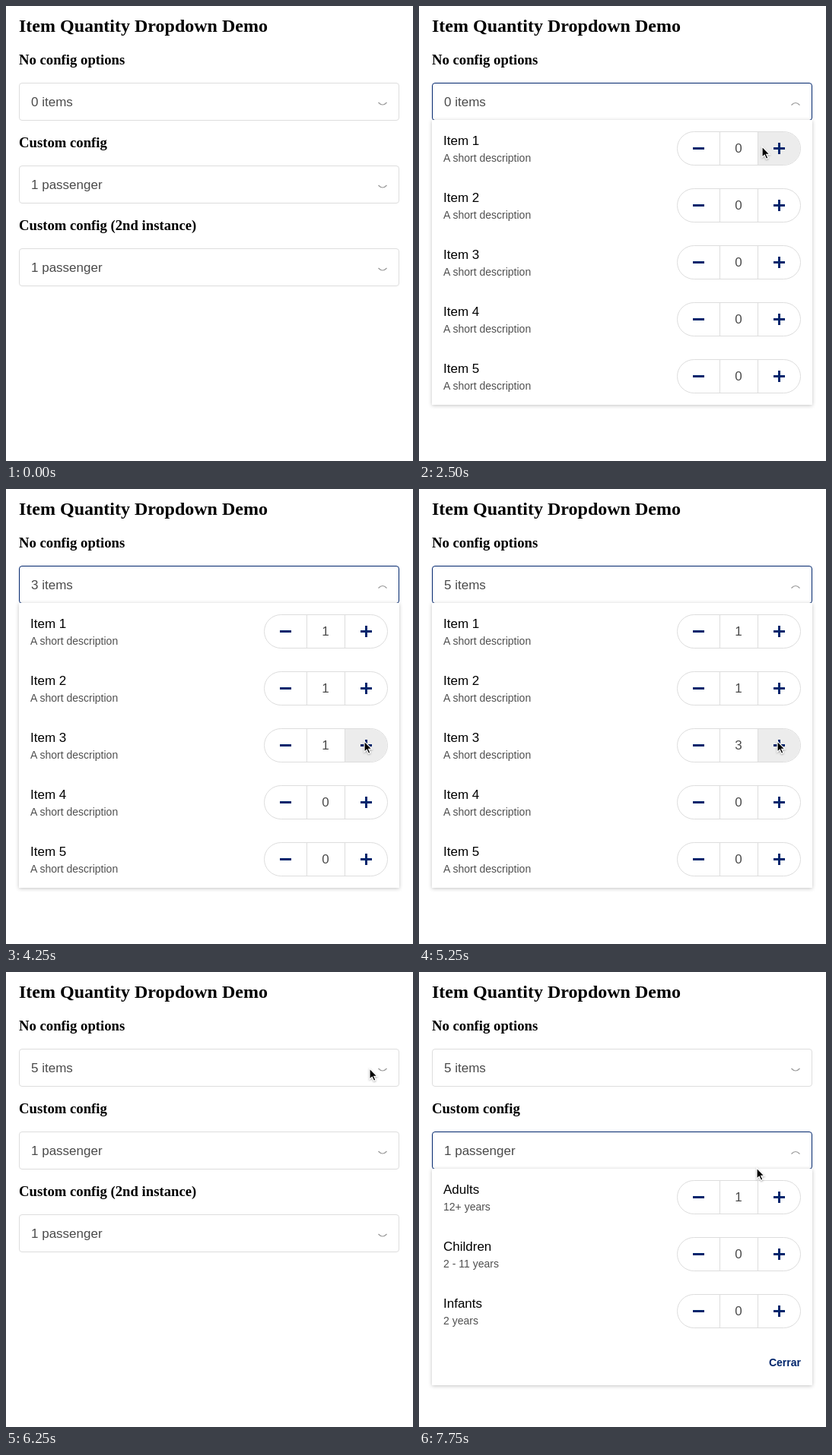
An HTML page that plays this animation: 535x599 px, repeating every 8000 ms.

```html
<!DOCTYPE html>
<html lang="en">
<head>
<meta charset="utf-8">
<title>Item Quantity Dropdown Demo</title>
<style>
  html, body { margin: 0; width: 100%; height: 100%; overflow: hidden; background: #fff; }
  svg { display: block; width: 535px; height: 599px; }
  text { font-family: "Liberation Sans", Arial, sans-serif; font-size: 17px; }
  .h2, .h3 { font-family: "Liberation Serif", Times, serif; font-weight: bold; font-size: 24px; }
  .h3 { font-size: 18.72px; }
  .label, .count { fill: #4a4a4a; }
  .count { text-anchor: middle; }
  .note { font-size: 14px; fill: #505050; }
  .close { font-size: 14px; font-weight: bold; fill: #00256c; text-anchor: end; }
  .box, .pill { fill: #fff; stroke: #ddd; }
  .split { fill: none; stroke: #ddd; }
  .open .box { stroke: #00256c; }
  .chevron { fill: none; stroke: #999; stroke-width: 1.2; }
  .panel { display: none; }
  .open .panel { display: inline; }
  .sheet { fill: #fff; filter: drop-shadow(0 1px 2.5px rgba(0, 0, 0, .24)); }
  .sign { fill: none; stroke: #00256c; stroke-width: 3; }
  .hover { fill: #ececec; visibility: hidden; }
  .cursor { stroke: #fff; stroke-width: 1.2; filter: drop-shadow(0 1px 1px rgba(0, 0, 0, .3)); }
</style>
</head>
<body>
<svg id="stage" viewBox="0 0 535 599"></svg>
<script>
const LOOP = 8000, ROW = 75;
const stage = document.getElementById('stage');

function add(parent, tag, attrs, content) {
  const el = document.createElementNS('http://www.w3.org/2000/svg', tag);
  for (const key in attrs) el.setAttribute(key, attrs[key]);
  if (content !== undefined) el.textContent = content;
  return parent.appendChild(el);
}
const text = (parent, cls, x, y, content) => add(parent, 'text', { class: cls, x, y }, content);
const path = (parent, cls, d) => add(parent, 'path', { class: cls, d });

function stepperRow(panel, top, name, note) {
  text(panel, '', 32, top + 18, name);
  text(panel, 'note', 32, top + 40, note);
  add(panel, 'rect', { class: 'pill', x: 339.5, y: top + .5, width: 162, height: 44, rx: 22 });
  const hover = path(panel, 'hover', `M446 ${top + 1}H479.5a21.5 21.5 0 0 1 0 43H446z`);
  path(panel, 'split', `M395.5 ${top}v45M445.5 ${top}v45`);
  path(panel, 'sign', `M360 ${top + 22.5}h15M466 ${top + 22.5}h15M473.5 ${top + 15}v15`);
  return { top, hover, count: text(panel, 'count', 420, top + 28, '') };
}

function dropdown(top, title, rows, panelHeight, unit, plural) {
  const group = add(stage, 'g', {});
  text(group, 'h3', 17, top - 24, title);
  add(group, 'rect', { class: 'box', x: 17.5, y: top + .5, width: 499, height: 49, rx: 3.5 });
  const label = text(group, 'label', 33, top + 31, '');
  const chevron = path(group, 'chevron', '');
  const panel = add(group, 'g', { class: 'panel' });
  add(panel, 'rect', { class: 'sheet', x: 17, y: top + 49, width: 500, height: panelHeight });
  const steppers = rows.map(([name, note], i) => stepperRow(panel, top + 64 + i * ROW, name, note));

  function update(counts, open, x, y) {
    const total = counts.reduce((a, b) => a + b, 0);
    label.textContent = `${total} ${total === 1 ? unit : plural}`;
    group.setAttribute('class', open ? 'open' : '');
    chevron.setAttribute('d', open
      ? `M489.5 ${top + 29.5}q5.5 -6 11 0`
      : `M489.5 ${top + 26}q5.5 6 11 0`);
    steppers.forEach((s, i) => {
      s.count.textContent = counts[i];
      const over = open && x > 445 && x < 502 && y >= s.top && y < s.top + 45;
      s.hover.style.visibility = over ? 'visible' : 'hidden';
    });
  }
  return { panel, update };
}

text(stage, 'h2', 17, 34, 'Item Quantity Dropdown Demo');
const passengers = [['Adults', '12+ years'], ['Children', '2 - 11 years'], ['Infants', '2 years']];
const items = [1, 2, 3, 4, 5].map(n => [`Item ${n}`, 'A short description']);

// Built bottom up so that an open panel covers the fields below it.
const third = dropdown(319, 'Custom config (2nd instance)', passengers, 285, 'passenger', 'passengers');
const second = dropdown(210, 'Custom config', passengers, 285, 'passenger', 'passengers');
const first = dropdown(101, 'No config options', items, 375, 'item', 'items');
text(second.panel, 'close', 502, 519, 'Cerrar');
const cursor = path(stage, 'cursor', 'M0 0V14.2L3.2 11.2L5.6 16.4L8 15.3L5.7 10.3H10Z');

// Pointer positions: time, x, y
const moves = [
  [500, 203, 23], [750, 215, 48], [1000, 235, 86], [1250, 254, 121], [1500, 263, 137],
  [2250, 370, 166], [2500, 451, 185], [3000, 462, 228], [3250, 468, 280],
  [3750, 470, 300], [4000, 471, 332], [5500, 475, 225], [5750, 478, 127],
  [6500, 468, 156], [6750, 446, 204], [7000, 430, 232], [7500, 437, 246], [7750, 444, 258]
];
// Clicks on the plus buttons of the first list: time, row
const clicks = [[2750, 0], [3500, 1], [4250, 2], [4750, 2], [5250, 2]];

function render(t) {
  const spot = moves.filter(m => m[0] <= t).pop();
  const [, x, y] = spot || [0, -50, -50];
  cursor.setAttribute('transform', `translate(${x} ${y})`);
  const counts = [0, 0, 0, 0, 0];
  for (const [at, row] of clicks) if (t >= at) counts[row]++;
  first.update(counts, t >= 1750 && t < 6250, x, y);
  second.update([1, 0, 0], t >= 7250, x, y);
  third.update([1, 0, 0], false, x, y);
}

const start = performance.now();
function frame() {
  render((performance.now() - start) % LOOP);
  requestAnimationFrame(frame);
}
frame();
</script>
</body>
</html>
```
